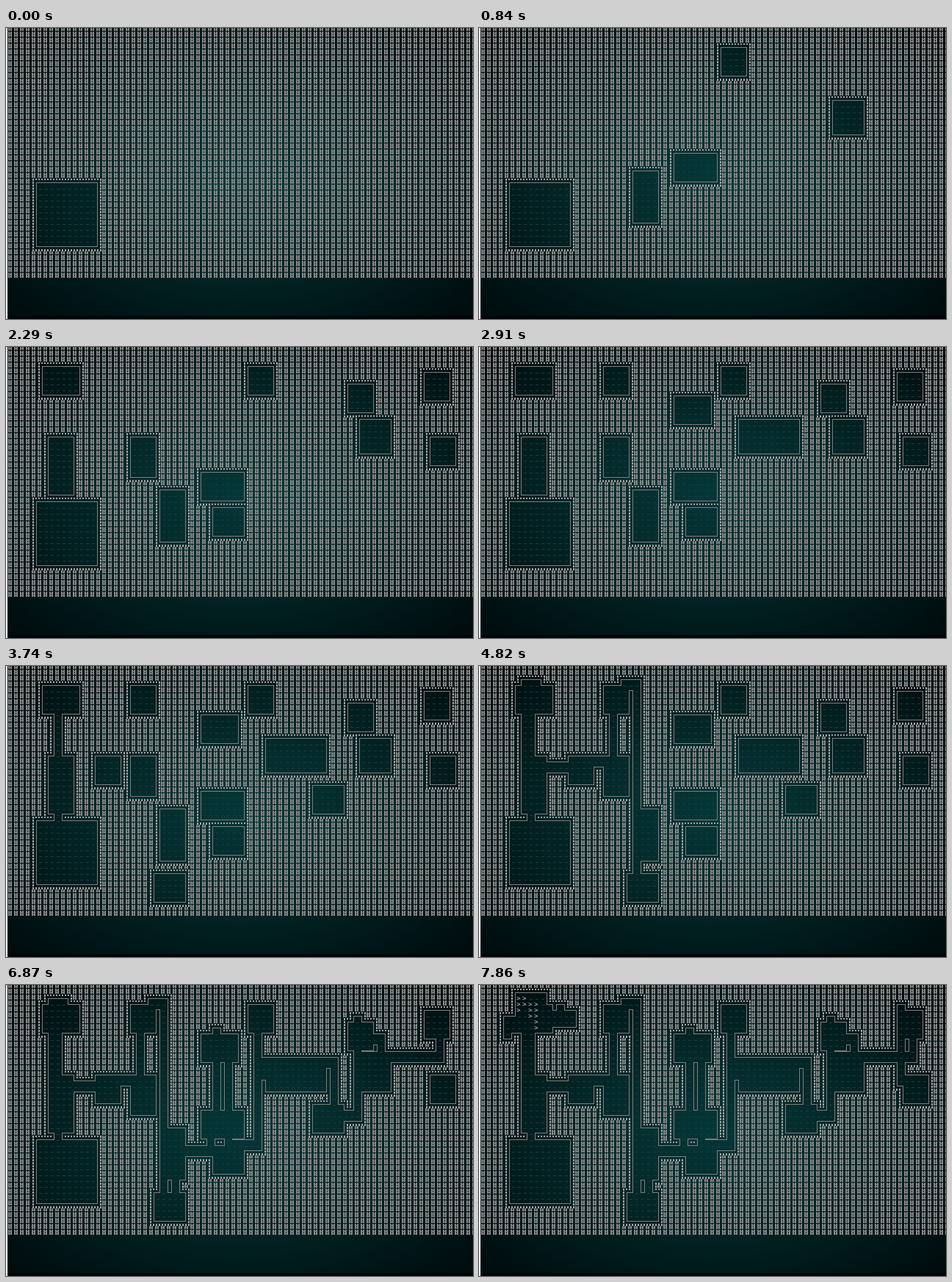
Animation of 636 by 396 pixels, one loop 8000 ms. Source, as an HTML page with a canvas:

```html
<!DOCTYPE html>
<html lang="en">
<head>
<meta charset="utf-8">
<title>Dungeon generator</title>
<style>
html, body { margin: 0; width: 100%; height: 100%; overflow: hidden; background: #000; }
canvas {
  display: block;
  background: radial-gradient(ellipse farthest-corner, #043738, #042c2d 30%, #021f20 58%, #001416 80%, #000a0b);
}
</style>
</head>
<body>
<canvas id="stage" width="636" height="396"></canvas>
<script>
const ctx = document.getElementById('stage').getContext('2d');
const CELL = 8, LEFT = 2, TOP = 5, MAP_BOTTOM = 341;
const LOOP = 8000, TICK = 76.3;

const room = (x, y, w = 4, h = 4) => ({ x, y, w, h });
const span = (x1, y1, x2, y2) =>
  room(Math.min(x1, x2), Math.min(y1, y2), Math.abs(x2 - x1) + 1, Math.abs(y2 - y1) + 1);

// Straight corridor through the middle of the side two rooms share.
function link(a, b, shift = 0) {
  const middle = (axis, size) => shift + Math.floor(
    (Math.max(a[axis], b[axis]) + Math.min(a[axis] + a[size], b[axis] + b[size]) - 1) / 2);
  if (a.y + a.h <= b.y) {
    const x = middle('x', 'w');
    return [span(x, a.y + a.h, x, b.y)];
  }
  const y = middle('y', 'h');
  return [span(a.x + a.w, y, b.x, y)];
}

// Corridor out of the top of a, sideways, then down to b.
function arch(a, exit, b, entry) {
  const x = b.x + entry, y = a.y - 1;
  return [span(a.x + exit, y, x, y), span(x, y, x, b.y)];
}

// Corridor sideways from the middle of a, then up or down to b.
function elbow(a, exit, b, entry) {
  const x = b.x + entry, y = a.y + exit;
  return [span(a.x + (a.w >> 1), y, x, y), span(x, y, x, b.y)];
}

const vault = room(5, 26, 10, 10), den = room(6, 3, 6), gallery = room(7, 15, 4, 9);
const pantry = room(15, 15), loft = room(21, 3), shrine = room(21, 15, 4, 6);
const well = room(26, 24, 4, 8), cellar = room(25, 35, 5);
const attic = room(33, 8, 6), court = room(33, 21, 7), crypt = room(35, 27, 5);
const tower = room(41, 3), hall = room(44, 12, 10, 5), store = room(52, 20, 5);
const nook = room(58, 6), forge = room(60, 12, 5, 5), cell = room(71, 4), jail = room(72, 15);

const steps = [
  ...[well, tower, court, forge, crypt,
    den, gallery, shrine, nook, cell, jail,
    loft, attic, hall, store, pantry, cellar].map(r => [r]),
  link(den, vault),
  arch(den, 3, gallery, 0),
  link(gallery, pantry),
  link(pantry, shrine, -1),
  link(loft, shrine),
  arch(loft, 3, cellar, 1),
  link(well, cellar, 1),
  link(well, crypt, -1),
  [...arch(attic, 2, court, 2), ...link(court, crypt, -3)],
  link(attic, crypt, 1),
  elbow(crypt, -1, tower, 1),
  [room(42, 12, 2, 3)],
  elbow(hall, 0, store, 3),
  [...arch(nook, 1, forge, -1), ...elbow(store, 1, forge, -1)],
  elbow(nook, 2, forge, 3),
  elbow(nook, 5, cell, 2),
  arch(cell, 0, jail, -1),
  // cave around the den
  [room(4, 5, 2, 2), room(4, 7, 1, 1)],
  [room(6, 1, 5, 2)],
  [room(12, 4, 4, 2), room(13, 3, 1, 1)],
  []
];

function texture(size, color, rects) {
  const tile = document.createElement('canvas');
  tile.width = tile.height = size;
  const t = tile.getContext('2d');
  t.fillStyle = color;
  rects.forEach(r => t.fillRect(...r));
  return ctx.createPattern(tile, 'repeat');
}
const rock = texture(CELL, '#888686', [[1, 0, 2, 7], [4, 0, 2, 7], [1, 2, 5, 1], [1, 5, 5, 1]]);
const ticks = texture(CELL / 2, '#a5a09f', [[2, 0, 2, 3]]);

// Paints all areas grown by the given margins; without a style it clears them.
function paint(areas, style, [l, t, r, b]) {
  ctx.fillStyle = style || '#000';
  for (const a of areas) {
    const box = [a.x * CELL - l, a.y * CELL - t, a.w * CELL + l + r, a.h * CELL + t + b];
    if (style) ctx.fillRect(...box);
    else ctx.clearRect(...box);
  }
}

function drawFloor(areas) {
  ctx.fillStyle = '#1c3a39';
  for (const a of areas)
    for (let x = a.x; x < a.x + a.w; x++)
      for (let y = a.y; y < a.y + a.h; y++) ctx.fillRect(x * CELL + 3, y * CELL + 6, 4, 1);
}

function drawMarks() {
  ctx.fillStyle = '#c8c4c0';
  ctx.font = '9px "DejaVu Sans Mono", monospace';
  [3, 2, 3, 5].forEach((count, i) => {
    for (let k = 0; k < count; k++)
      ctx.fillText('>', (den.x + i) * CELL + 1, (2 + (i >> 1) + k) * CELL);
  });
}

function draw(count) {
  const areas = [vault, ...steps.slice(0, count).flat()];
  ctx.setTransform(1, 0, 0, 1, 0, 0);
  ctx.clearRect(0, 0, 636, 396);
  ctx.translate(LEFT, TOP);
  ctx.fillStyle = rock;
  ctx.fillRect(0, -TOP, 636, MAP_BOTTOM);

  // Nested layers leave a ticked outer rim and a thin inner line.
  paint(areas, null, [7, 8, 8, 11]);
  paint(areas, ticks, [6, 8, 8, 11]);
  paint(areas, null, [4, 6, 6, 7]);
  paint(areas, '#827c7b', [1, 3, 3, 5]);
  paint(areas, null, [0, 2, 2, 4]);
  drawFloor(areas);
  if (count === steps.length) drawMarks();

  ctx.setTransform(1, 0, 0, 1, 0, 0);
  ctx.fillStyle = '#000606';
  ctx.fillRect(0, 392, 636, 4);
  ctx.fillStyle = '#fff';
  ctx.fillRect(0, 0, LEFT, 396);
}

// Steps come at an even pace, seen on a coarser clock.
function stepsAt(time) {
  const tick = Math.floor(time / TICK);
  return steps.filter((_, i) => Math.floor(2.707 * i + 3.678) <= tick).length;
}

let shown = -1;
function frame() {
  const count = stepsAt(performance.now() % LOOP);
  if (count !== shown) draw(shown = count);
  requestAnimationFrame(frame);
}
frame();
</script>
</body>
</html>
```
